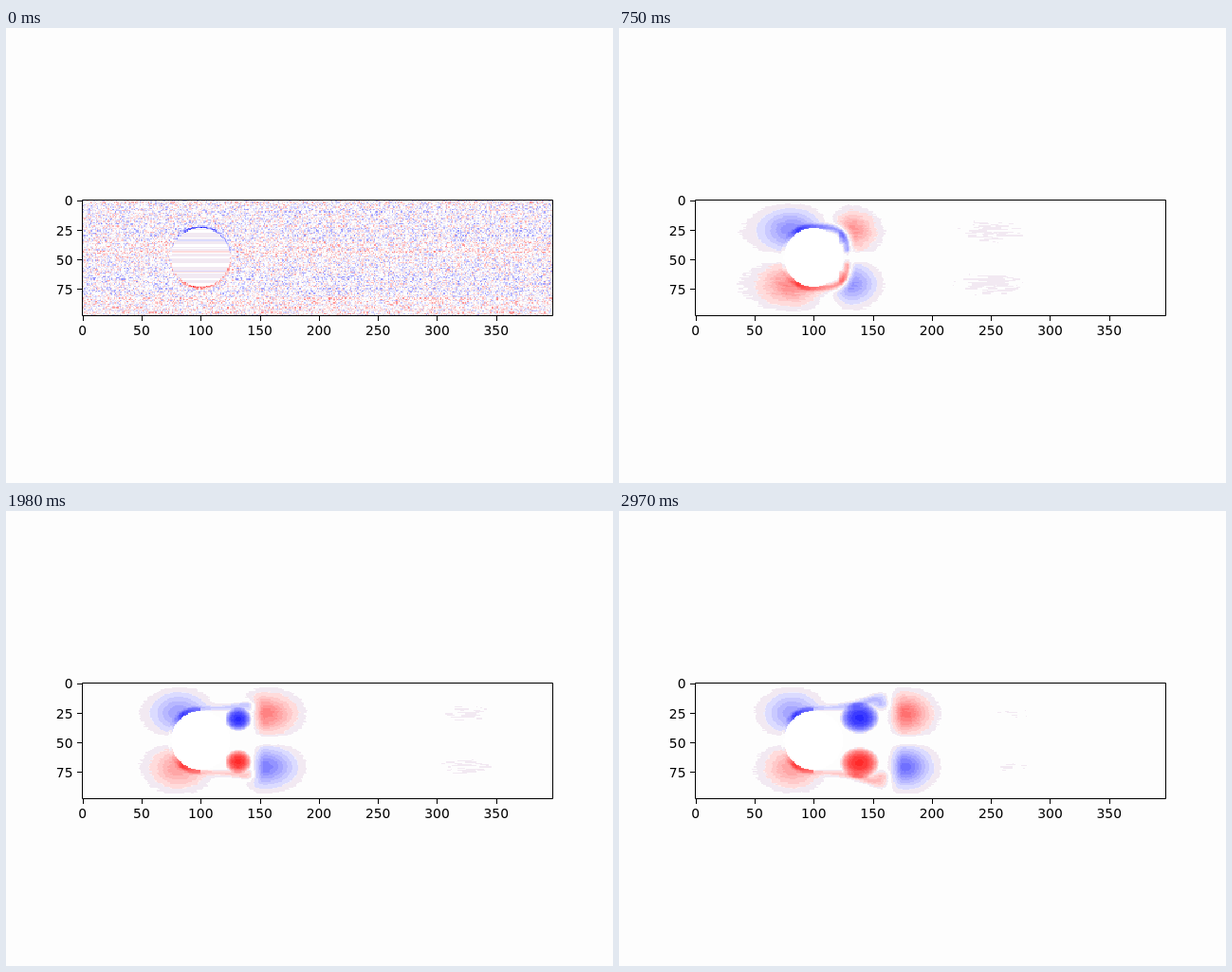
These frames come from a looping animation (640 by 480 pixels, 3 s). An HTML page with a canvas:

```html
<!DOCTYPE html>
<html lang="en">
<head>
<meta charset="utf-8">
<title>Vorticity behind a cylinder</title>
<style>
  html, body { margin: 0; width: 100%; height: 100%; overflow: hidden; background: #fdfdfd; }
  #field { position: absolute; left: 80px; top: 181.33px; width: 496px; height: 122.13px; image-rendering: pixelated; }
  svg { position: absolute; left: 0; top: 0; }
  text { font: 13.89px "DejaVu Sans", sans-serif; }
</style>
</head>
<body>
<canvas id="field" width="398" height="98"></canvas>
<svg id="axes" width="640" height="480" viewBox="0 0 640 480"></svg>
<script>
const COLS = 398, ROWS = 98, CELL = 496 / COLS, TOP = 181.33;
const STEP = 30, LOOP = 3000, BG = 253, RADIUS = 31;

const clamp = x => Math.max(0, Math.min(1, x));
const gauss = (x, y = 0) => Math.exp(-(x * x + y * y) / 2);

// Shape of the flow after s seconds; lengths are in pixels from the cylinder centre
function pose(s) {
  const birth = 1 - Math.exp(-s / .12);
  const pulse = .5 + .5 * Math.cos(2 * Math.PI * (s - .75) / .93);
  return {
    front: { amp: birth * (.34 + .06 * pulse), left: 17 + 2 * pulse },
    veil: birth * (.02 + .04 * pulse),
    layer: {
      peak: -20 + 18 * Math.exp(-s / .5),
      thick: 2.2 - 1.1 * Math.exp(-s / .3),
      decay: 20 + 25 * clamp(s / .75),
      width: 32 + 6 * s ** 1.75,
      power: 2 + 8 * clamp(s / 1.8) ** 2,
      rise: .003 * clamp((s - 1.1) / 1.2),
      fade: 30 * clamp((s - .9) / .8)
    },
    core: { x: 22 + 9 * s, y: 20 + 1.3 * s, rx: 1 + 6.8 * s, ry: 5 + 4 * s, amp: .82 * clamp((s - .5) / .9) },
    wake: { x: 28 + 14 * s + 3 * s * s, amp: birth * (.36 + .07 * s), right: 16 + 12 * gauss((s - 2.35) / .25) },
    far: { x: 180 + 100 * Math.sin(Math.PI * (s - .5) / 3) ** 2, amp: birth * (.03 + .03 * s * pulse) }
  };
}

// Repeatable random value in -1..1
function rand(x, y, seed) {
  let h = Math.imul(x + 11, 374761393) ^ Math.imul(y + 7, 668265263) ^ Math.imul(seed + 3, 974634777);
  h = Math.imul(h ^ (h >>> 13), 1274126177);
  h = Math.imul(h ^ (h >>> 16), 2246822519);
  return ((h ^ (h >>> 15)) >>> 0) / 2147483648 - 1;
}

// Streaks that vary slowly along a row
function streak(col, row, seed) {
  const x = col / 6 + row * .37, i = Math.floor(x);
  const a = rand(i, row, seed);
  return a + (rand(i + 1, row, seed) - a) * (x - i);
}

// Distance from the shear layer: round upstream, a widening box downstream
function layerDistance(u, v, { width, power, rise }) {
  if (u < 0) return Math.hypot(u, v) - 32;
  const height = 32 + rise * Math.min(u, width) ** 2;
  return (((u / width) ** power + (v / height) ** power) ** (1 / power) - 1) * 32;
}

// Vorticity above the centre line; negative is blue
function flow(u, v, { front, veil, layer, core, wake, far }, rough) {
  const distant = far.amp * gauss((u - far.x) / 40, (v - 28) / 13);
  if (u > 190) return distant;
  const d = layerDistance(u, v, layer);

  const fu = u + 22;
  const ahead = front.amp * gauss(fu / (fu < 0 ? front.left : 18), (v - 29) / 13.5)
    + veil * gauss((u + 45) / 30, (v - 28) / 15);

  const along = u < layer.peak
    ? clamp((u + 32) / (layer.peak + 32))
    : 1 / (1 + (u - layer.peak) / layer.decay);
  const side = u > 0 ? clamp((v - layer.fade) / 8) : clamp(v / 10);
  const shear = .75 * along * side * gauss(d / layer.thick);

  const r2 = ((u - core.x) / core.rx) ** 2 + ((v - core.y) / core.ry) ** 2;
  const swirl = u > 27 && r2 < 1 ? core.amp * (1 - r2 ** 1.3) : 0;

  const wu = u - wake.x;
  const behind = wake.amp * clamp((d - 1) / 8) * gauss(wu / (wu < 0 ? 12 : wake.right), (v - 28) / 13);

  const edge = clamp(v / 8) * clamp((62 - v) / 7);
  return edge * ((behind - ahead * clamp(d / 3)) * rough - shear - swirl) + distant;
}

const ctx = document.getElementById("field").getContext("2d");
const image = ctx.createImageData(COLS, ROWS);

function paint(offset, value, blank) {
  const a = Math.abs(value);
  let r = blank, g = blank, b = blank;
  if (a > .1) {
    const pale = Math.round(255 * (1 - Math.min(1, Math.round(a / .07) * .07)));
    r = value > 0 ? 255 : pale;
    g = pale;
    b = value > 0 ? pale : 255;
  } else if (a > .045) {
    r = b = 242;
    g = 233;
  }
  const px = image.data;
  px[offset] = r;
  px[offset + 1] = g;
  px[offset + 2] = b;
  px[offset + 3] = 255;
}

function drawField(frame) {
  const t = frame * STEP, p = pose(t / 1000);
  const speckle = Math.exp(-t / 60);
  const ripple = .01 + .11 * Math.exp(-t / 230);
  const ragged = .05 + .9 * Math.exp(-t / 260);
  const seed = Math.floor(frame / 3);

  for (let row = 0; row < ROWS; row++) {
    const y = TOP + (row + .5) * CELL - 242.4, v = Math.abs(y);
    const tint = rand(1, row, frame);
    const band = .08 * Math.cos((row - 43) * Math.PI / 24) + .12 * tint;
    for (let col = 0; col < COLS; col++) {
      const u = (col + .5) * CELL - 125;
      const offset = (row * COLS + col) * 4;
      if (u * u + v * v < RADIUS * RADIUS) {
        paint(offset, tint * .12 * speckle, 255);
        continue;
      }
      const n = streak(col, row, seed);
      let value = flow(u, v, p, 1 + ragged * n) * (y < 0 ? 1 : -1) + ripple * (1 - speckle) * n;
      if (speckle > .01) {
        const s = rand(col, row, frame);
        value += speckle * Math.abs(s) * (s * .32 + band);
      }
      paint(offset, value, BG);
    }
  }
  ctx.putImageData(image, 0, 0);
}

function drawAxes() {
  let lines = "M80.5 181.5H576.5V303.5H80.5Z", labels = "";
  for (let n = 0; n <= 350; n += 50) {
    const x = 80 + (n + .5) * CELL;
    lines += `M${Math.round(x) + .5} 304v5`;
    labels += `<text x="${x}" y="324" text-anchor="middle">${n}</text>`;
  }
  for (let n = 0; n <= 75; n += 25) {
    const y = TOP + (n + .5) * CELL;
    lines += `M80 ${Math.round(y) + .5}h-5`;
    labels += `<text x="70.5" y="${Math.round(y + 5.5)}" text-anchor="end">${n}</text>`;
  }
  document.getElementById("axes").innerHTML =
    `<path d="${lines}" fill="none" stroke="#000"/>${labels}`;
}

let shown = -1;
const start = performance.now();

function tick() {
  const frame = Math.floor(((performance.now() - start) % LOOP) / STEP);
  if (frame !== shown) drawField(shown = frame);
  requestAnimationFrame(tick);
}

drawAxes();
tick();
</script>
</body>
</html>
```
